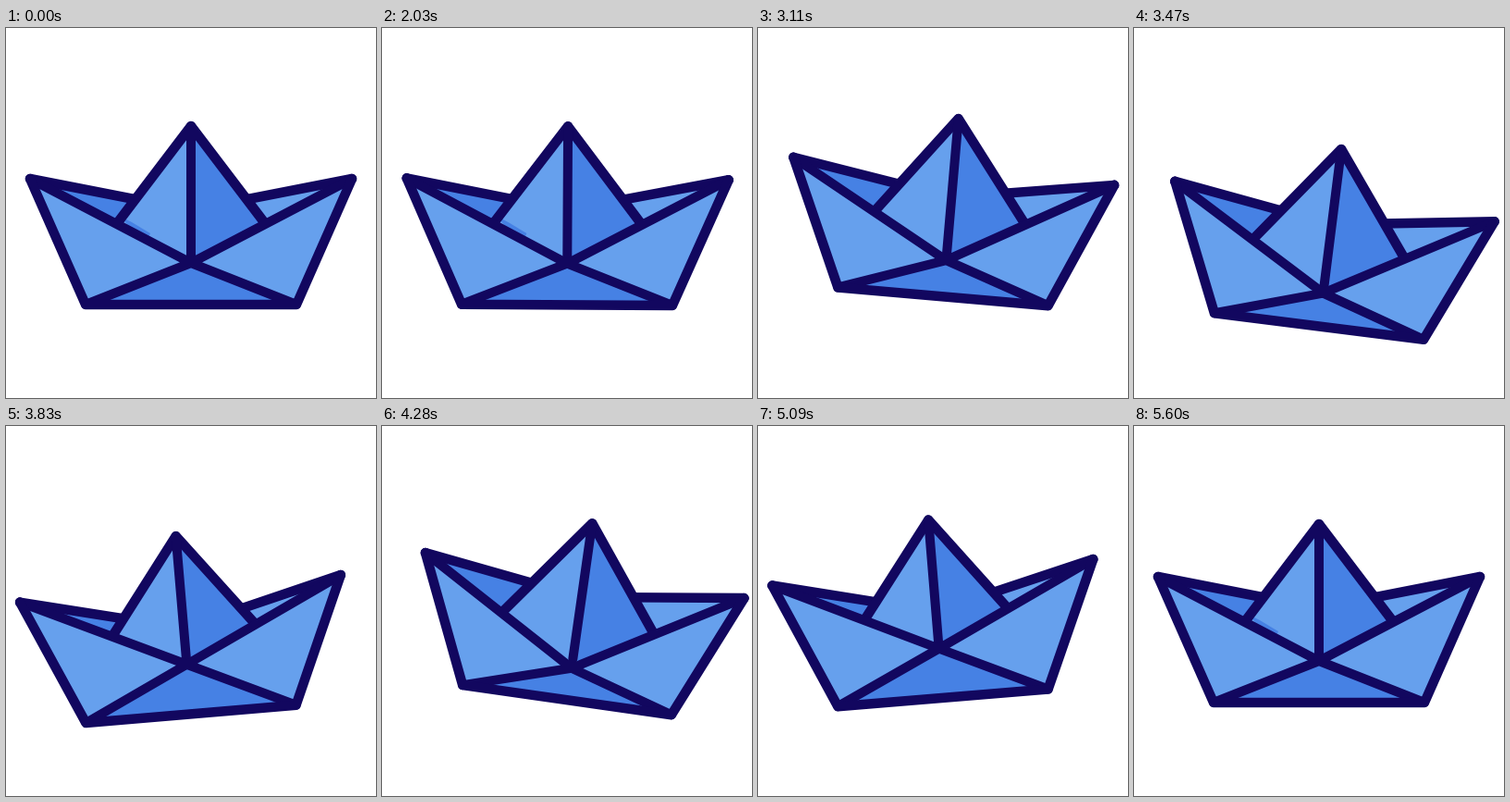
These frames come from a looping animation (400x400 px, 5.63 s). An HTML page:

```html
<!DOCTYPE html>
<html lang="en">
<head>
<meta charset="utf-8">
<title>Paper boat</title>
<style>
  html, body { margin: 0; width: 100%; height: 100%; overflow: hidden; background: #fff; }
  svg { display: block; width: 100%; height: 100%; }
  .light { fill: #66a0ed; }
  .dark { fill: #4681e4; }
  .line { fill: none; stroke: #12075f; stroke-width: 10; stroke-linecap: round; stroke-linejoin: round; }
  .rim { stroke-width: 10.5; }
</style>
</head>
<body>
<svg viewBox="0 0 400 400">
  <g id="boat">
    <path id="backLeft" class="dark"/>
    <path id="backRight" class="light"/>
    <path id="backRim" class="line rim"/>
    <path class="light" d="M200 106L105 231L200 299Z"/>
    <path class="dark" d="M200 106L295 231L200 299Z"/>
    <path id="shade" class="dark" d="M124 204L136 210L156 222L150 235Z"/>
    <path class="line rim" d="M105 231L200 106L295 231"/>
    <path class="line" d="M200 106V254"/>
    <path id="sides" class="light"/>
    <path id="base" class="dark"/>
    <path id="folds" class="line"/>
    <path class="line rim" d="M26 163L86 299H314L374 163"/>
  </g>
</svg>
<script>
  const LOOP = 5630, REST = 2000, STEP = 30, STEPS = 120;
  const ease = p => p * p * (3 - 2 * p);
  const el = id => document.getElementById(id);

  // Swings from 0 between high and low at each turning step, then back to 0
  function swing(turns, high, low) {
    const at = [0, ...turns, STEPS];
    const value = i => i === 0 || i === at.length - 1 ? 0 : i % 2 ? high : low;
    return k => {
      const i = Math.max(1, at.findIndex(t => t >= k));
      const from = value(i - 1);
      return from + (value(i) - from) * ease((k - at[i - 1]) / (at[i] - at[i - 1]));
    };
  }

  const tiltTurns = [9.3, 26, 44, 62, 80, 100];
  const bobTurns = tiltTurns.map((_, i) => 17 + 18 * i);
  const tilt = swing(tiltTurns, 10, -5);
  const fold = swing(tiltTurns, 13, -9);
  const bob = swing(bobTurns, 28.3, -10);

  function draw(ms) {
    const k = Math.min(STEPS, Math.max(0, Math.floor((ms % LOOP - REST) / STEP)));
    const sag = fold(k);
    const mid = `200 ${254 + sag}`, back = `200 ${197 - sag}`;
    const shapes = {
      backLeft: `M26 163L${back}L${mid}Z`,
      backRight: `M374 163L${back}L${mid}Z`,
      backRim: `M26 163L${back}L374 163`,
      sides: `M26 163L86 299L${mid}ZM374 163L314 299L${mid}Z`,
      base: `M86 299H314L${mid}Z`,
      folds: `M26 163L${mid}L314 299M374 163L${mid}L86 299`
    };
    for (const id in shapes) el(id).setAttribute('d', shapes[id]);
    el('shade').setAttribute('opacity', Math.abs(sag) < 1 ? 1 : 0);
    el('boat').setAttribute('transform', `translate(0 ${bob(k)}) rotate(${tilt(k)} 200 299)`);
  }

  const start = performance.now();
  function tick(now) {
    draw(Math.max(0, now - start));
    requestAnimationFrame(tick);
  }
  draw(0);
  requestAnimationFrame(tick);
</script>
</body>
</html>
```
